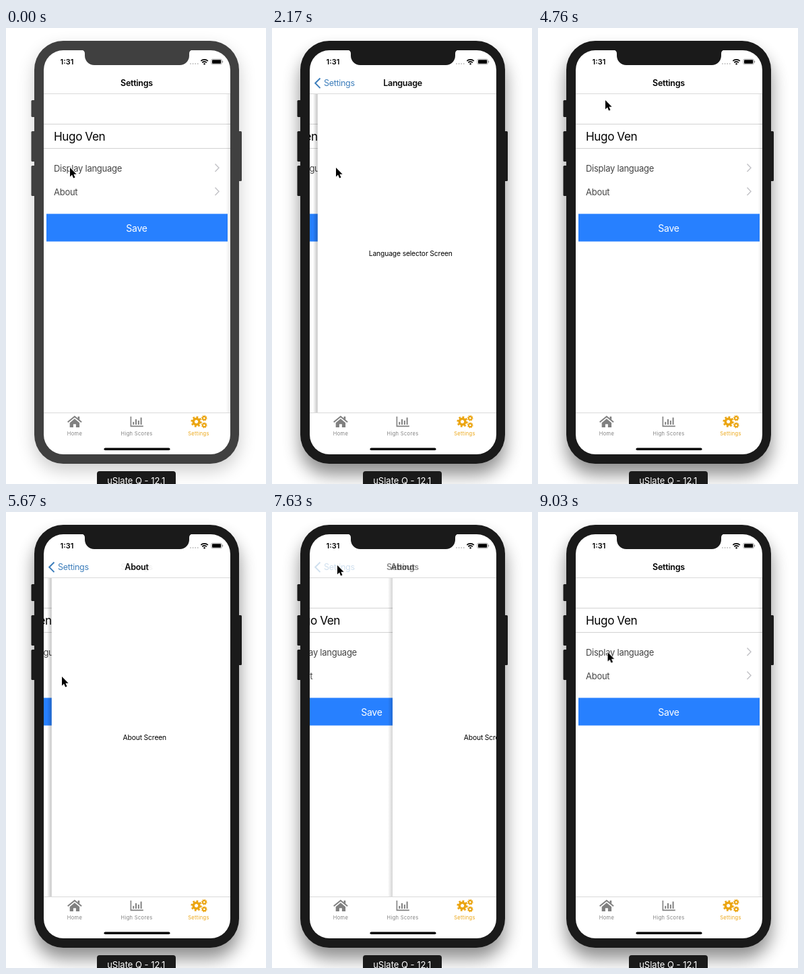
Recreate the animation shown at these times as an HTML page. Size 386x676 px, loop 9.52 s.

```html
<!DOCTYPE html>
<html lang="en">
<head>
<meta charset="utf-8">
<title>Settings navigation</title>
<style>
  @property --push { syntax: "<number>"; inherits: true; initial-value: 0; }
  @property --press { syntax: "<number>"; inherits: true; initial-value: 1; }

  html, body { margin: 0; width: 100%; height: 100%; overflow: hidden; background: #fff; }
  svg {
    --t: 0;
    display: block; width: 100%; height: 100%;
    font: 400 13px Inter, Roboto, sans-serif;
    letter-spacing: -.02em;
  }
  .anim {
    animation: 9520ms linear infinite paused;
    animation-delay: calc(var(--t) * -1ms);
  }
  .mid { text-anchor: middle; }

  #app { animation-name: push, press; }
  #shell { fill: #404040; animation-name: focus; animation-timing-function: step-end; }
  #shadow { opacity: .2; animation-name: shade; animation-timing-function: step-end; }
  #cursor { animation-name: point; }
  .language { animation-name: first; animation-timing-function: step-end; }
  .about { animation-name: second; animation-timing-function: step-end; }

  #list { transform: translateX(calc(var(--push) * -83px)); }
  #card { transform: translateX(calc((1 - var(--push)) * 285px)); }
  #card { transform: translateX(calc((1 - var(--push)) * 277px)); }
  #edge { opacity: calc(.25 + .5 * var(--push)); }
  #rootTitle { opacity: calc(1 - var(--push)); }
  #cardTitle { opacity: var(--push); }
  #back { opacity: calc(var(--push) * var(--press)); }

  .title { font-size: 12.5px; font-weight: 600; text-anchor: middle; }
  .body { font-size: 10.35px; letter-spacing: -.016em; text-anchor: middle; }
  .tab { font-size: 7.5px; letter-spacing: .045em; text-anchor: middle; }
  .line { stroke: #d2d2d2; }
  .stroke { fill: none; stroke: currentColor; }

  /* Opening and closing a screen: 500 ms each */
  @keyframes push {
    0% { --push: 0; }
    20.147% { --push: 0; animation-timing-function: cubic-bezier(.2833, .99, .31833, .99); }
    25.399% { --push: 1; }
    43.414% { --push: 1; animation-timing-function: cubic-bezier(.2833, .99, .31833, .99); }
    48.666% { --push: 0; }
    56.912% { --push: 0; animation-timing-function: cubic-bezier(.2833, .99, .31833, .99); }
    62.164% { --push: 1; }
    79.443% { --push: 1; animation-timing-function: cubic-bezier(.2833, .99, .31833, .99); }
    84.695%, 100% { --push: 0; }
  }
  @keyframes press {
    0%, 38.235% { --press: 1; }
    41.5%, 43.414% { --press: .2; }
    46.04%, 75% { --press: 1; }
    77.9%, 79.443% { --press: .2; }
    82.07%, 100% { --press: 1; }
  }
  @keyframes focus {
    0% { fill: #404040; }
    18.38%, 100% { fill: #1a1a1a; }
  }
  @keyframes shade {
    0% { opacity: .2; transform: translateY(-6px); }
    18.38%, 100% { opacity: .45; transform: none; }
  }
  @keyframes first {
    0% { visibility: visible; }
    52%, 100% { visibility: hidden; }
  }
  @keyframes second {
    0% { visibility: hidden; }
    52%, 100% { visibility: visible; }
  }
  @keyframes point {
    0%, 30.882% { transform: translate(95px, 207px); }
    34.559%, 35.294% { transform: translate(100px, 90px); }
    37.5%, 48.529% { transform: translate(99.5px, 77px); }
    50% { transform: translate(100px, 107px); }
    51.471% { transform: translate(90px, 180px); }
    52.941% { transform: translate(83px, 228px); }
    55.147%, 69.853% { transform: translate(83px, 244px); }
    74.265%, 86.765% { transform: translate(97px, 79px); }
    90.441% { transform: translate(150px, 245px); }
    91.912% { transform: translate(176px, 281px); }
    94.853%, 100% { transform: translate(103.5px, 208px); }
  }
</style>
</head>
<body>
<svg id="stage" viewBox="0 0 386 676">
  <defs>
    <filter id="blur" x="-30%" y="-20%" width="160%" height="140%">
      <feGaussianBlur stdDeviation="13"/>
    </filter>
    <linearGradient id="fade">
      <stop offset="0" stop-opacity="0"/>
      <stop offset="1" stop-opacity=".32"/>
    </linearGradient>
    <clipPath id="pages"><rect x="56" y="98" width="277" height="472"/></clipPath>
    <g id="gear" class="stroke">
      <circle r="4.4" stroke-width="3.6"/>
      <circle r="6.8" stroke-width="2.8" pathLength="16" stroke-dasharray="1"/>
    </g>
    <path id="more" d="M310.5 -6l5.5 5.8-5.5 5.8" fill="none" stroke="#c4c4c8" stroke-width="1.5"/>
  </defs>

  <rect id="shadow" class="anim" x="42" y="36" width="304" height="626" rx="42" filter="url(#blur)"/>

  <g id="shell" class="anim">
    <rect x="37.5" y="107" width="8" height="25" rx="1.5"/>
    <rect x="37.5" y="153" width="8" height="45" rx="1.5"/>
    <rect x="37.5" y="204" width="8" height="45" rx="1.5"/>
    <rect x="342" y="153" width="8" height="74" rx="1.5"/>
    <rect x="42" y="19" width="304" height="627" rx="43"/>
    <rect x="56" y="33" width="277" height="599" rx="29" fill="#fff"/>
    <path d="M112 32.5q5 .5 5 5.5v3a14 14 0 0 0 14 14h127a14 14 0 0 0 14-14v-3q0-5 5-5.5z"/>
  </g>

  <g id="app" class="anim">
    <g clip-path="url(#pages)">
      <g id="list">
        <path class="line" d="M56 142.5h277M56 178.5h277"/>
        <text x="71" y="167" font-size="17.2" letter-spacing="-.45">Hugo Ven</text>
        <g fill="#444">
          <text x="71" y="212.5">Display language</text>
          <text x="71" y="247.5">About</text>
        </g>
        <use href="#more" y="207.5"/>
        <use href="#more" y="242.5"/>
        <rect x="60" y="275.5" width="269" height="41" fill="#2780ff"/>
        <text class="mid" x="194" y="301.5" font-size="14" fill="#fff">Save</text>
      </g>
      <g id="card">
        <rect id="edge" x="49" y="98" width="7" height="472" fill="url(#fade)"/>
        <rect x="56" y="98" width="277" height="472" fill="#fff"/>
        <text class="body anim language" x="194" y="338">Language selector Screen</text>
        <text class="body anim about" x="194" y="338">About Screen</text>
      </g>
    </g>

    <path class="line" d="M56 97.5h277" opacity=".8"/>
    <text id="rootTitle" class="title" x="194" y="86">Settings</text>
    <g id="cardTitle">
      <text class="title anim language" x="194" y="86">Language</text>
      <text class="title anim about" x="194" y="86">About</text>
    </g>
    <g id="back" fill="#3478b8" color="#3478b8">
      <path class="stroke" d="M71.5 74.5l-7.3 7.3 7.3 7.3" stroke-width="2"/>
      <text x="77" y="86" font-size="12.5" letter-spacing="-.3">Settings</text>
    </g>
  </g>

  <g id="status">
    <text class="mid" x="90.5" y="54" font-size="11" font-weight="600" letter-spacing="0">1:31</text>
    <path d="M274 53h13" stroke="#bbb" stroke-width="1.8" stroke-linecap="round" stroke-dasharray="0 3.6"/>
    <path class="stroke" d="M289.4 49a7.2 7.2 0 0 1 10.4 0M291.4 51.3a4.5 4.5 0 0 1 6.4 0" stroke-width="1.7"/>
    <circle cx="294.6" cy="53.2" r="1.2"/>
    <rect x="304.8" y="46.2" width="15.6" height="7.6" rx="2" fill="none" stroke="#999" stroke-width=".8"/>
    <rect x="306" y="47.3" width="13.2" height="5.4" rx="1"/>
    <rect x="321" y="48.6" width="1.2" height="2.8" rx=".6" fill="#999"/>
  </g>

  <g id="tabs">
    <path class="line" d="M56 570.5h277" opacity=".8"/>
    <g fill="#808080" color="#808080">
      <path class="stroke" d="M91.7 584.3l10.2-8.3 10.2 8.3" stroke-width="2"/>
      <path d="M94.7 585.2l7.2-5.9 7.2 5.9v6.9h-5.2v-4.8h-4v4.8h-5.2zM106.6 576h2.6v5l-2.6-2z"/>
      <path class="stroke" d="M185.4 576v14.4h18.4" stroke-width="1.6"/>
      <path class="stroke" d="M189.3 588v-4M193 588v-8M196.8 588v-6M200.6 588v-10.5" stroke-width="2"/>
      <text class="tab" x="102" y="603.8">Home</text>
      <text class="tab" x="194" y="603.8">High Scores</text>
    </g>
    <g fill="#eba512" color="#eba512">
      <use href="#gear" transform="translate(282.6 583.6)"/>
      <use href="#gear" transform="translate(294.3 578.4) scale(.53)"/>
      <use href="#gear" transform="translate(294.3 588.9) scale(.53)"/>
      <text class="tab" x="286" y="603.8">Settings</text>
    </g>
    <rect x="145.5" y="622.4" width="98" height="3.6" rx="1.8"/>
  </g>

  <rect x="135" y="657" width="117" height="30" rx="4" fill="#1a1a1a"/>
  <text class="mid" x="193.3" y="676.3" font-size="13" letter-spacing="0" fill="#fff">uSlate Q - 12.1</text>

  <path id="cursor" class="anim" d="M0 0V13.4l3-2.8 2.1 5 2.4-1-2.1-4.9h4.2z" stroke="#fff" stroke-width="1.6" paint-order="stroke"/>
</svg>
<script>
  const LOOP = 9520, STEP = 70;
  const stage = document.getElementById("stage");

  function tick() {
    const time = performance.now() % LOOP;
    stage.style.setProperty("--t", Math.floor(time / STEP) * STEP);
    requestAnimationFrame(tick);
  }
  tick();
</script>
</body>
</html>
```
